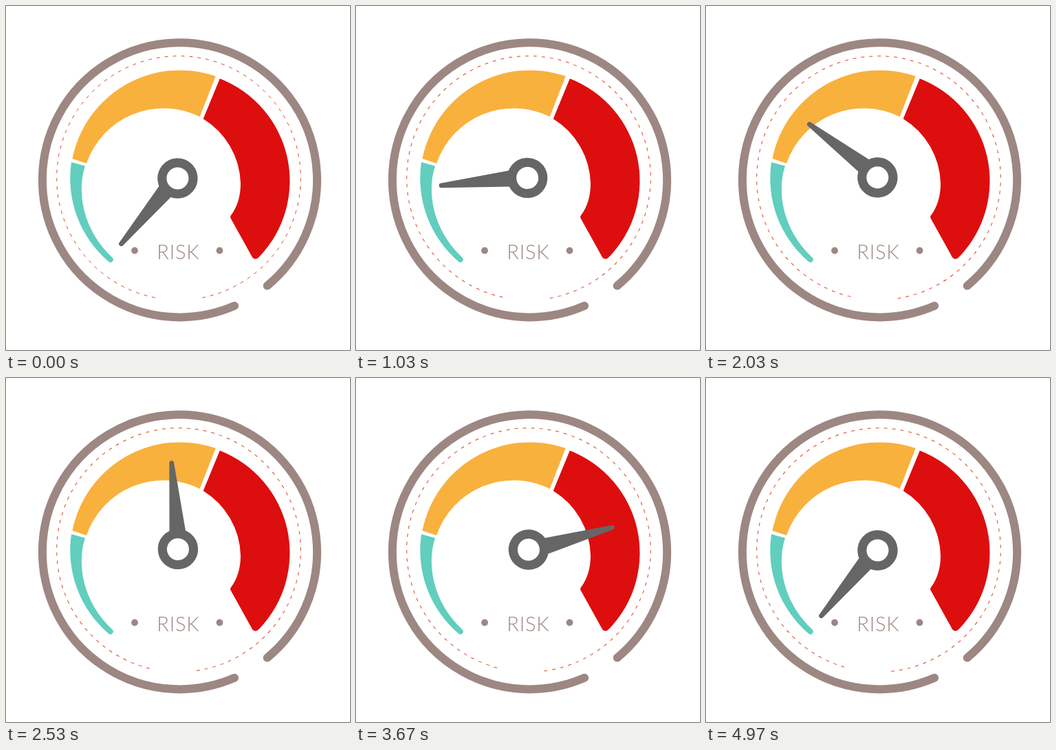
Recreate the animation shown at these times as an HTML page. Size 500x500 px, loop 5010 ms.

```html
<!DOCTYPE html>
<html lang="en">
<head>
<meta charset="utf-8">
<title>Risk gauge</title>
<style>
  html, body { margin: 0; width: 100%; height: 100%; overflow: hidden; background: #fff; }
  svg { display: block; width: 100vw; height: 100vh; }
  text { font: 300 29px Lato, "Open Sans", sans-serif; letter-spacing: 0.8px; }
</style>
</head>
<body>
<svg viewBox="0 0 500 500">
  <path id="rim" fill="none" stroke="#9d8782" stroke-width="12" stroke-linecap="round"/>
  <path id="dashes" fill="none" stroke="#dc4526" stroke-width="1"
    pathLength="1049" stroke-dasharray="5 7"/>

  <path fill="#61cebe" d="M95 227 L115 232.5 C102.5 270 111.5 326 155 366
    A4.1 4.1 0 0 1 149 371.5 A159.5 159.5 0 0 1 95 227Z"/>
  <path fill="#f9b13d" d="M96.5 222 A159.5 159.5 0 0 1 304.7 102 L281.7 161
    A118.5 118.5 0 0 0 117 228.7Z"/>
  <path fill="#dd0e0e" d="M310.8 105.5 A159.5 159.5 0 0 1 368.6 364 Q363.3 370.5 358.2 365.5
    L326.8 309 Q325.3 306.3 327 304.3 C337 291 341 275 341 258
    A114 114 0 0 0 286.7 164Z"/>

  <g fill="#9d8782">
    <circle cx="187" cy="355.5" r="4.9"/>
    <circle cx="310.5" cy="355.5" r="4.9"/>
    <text x="250.4" y="367.8" text-anchor="middle">RISK</text>
  </g>

  <g id="needle">
    <path fill="#666" d="M-3.4 -126.5 A3.4 3.4 0 0 1 3.4 -126.5 L13 -27 L0 -20 L-10.5 -27Z"/>
    <circle cy="-0.9" r="22.6" fill="#fff" stroke="#666" stroke-width="13.2"/>
  </g>
</svg>
<script>
  const LOOP = 5010;
  const DRIFT = 0.044; // degrees per step

  // step, needle angle from upright, degrees per step
  const KEYS = [
    [0, -139.3, 0.9],
    [25, -95, 1.8],
    [49, -52, 2.2],
    [61, -4.2, 7],
    [77, 139.4, 0],
    [99, -28.8, -7.2],
    [119, -139.3, 0]
  ];

  const get = id => document.getElementById(id);
  const needle = get('needle');
  const dashes = get('dashes');

  function point(cx, cy, r, deg) {
    const a = deg * Math.PI / 180;
    return `${cx + r * Math.cos(a)} ${cy + r * Math.sin(a)}`;
  }

  function arc(cx, cy, r, from, to) {
    return `M${point(cx, cy, r, from)} A${r} ${r} 0 1 1 ${point(cx, cy, r, to)}`;
  }

  // Smooth Hermite curve through the keys
  function angleAt(step) {
    let i = 1;
    while (i < KEYS.length - 1 && step > KEYS[i][0]) i++;
    const [s0, a0, v0] = KEYS[i - 1];
    const [s1, a1, v1] = KEYS[i];
    const span = s1 - s0;
    const u = (step - s0) / span;
    const w = 1 - u;
    return a0 * w * w * (1 + 2 * u) + a1 * u * u * (3 - 2 * u)
      + span * u * w * (v0 * w - v1 * u);
  }

  // 24 poses per second shown on a 30 per second clock
  function stepAt(ms) {
    const tick = Math.min(149, Math.floor(ms * 0.03 + 0.101));
    return Math.floor((tick * 4 + 1) / 5);
  }

  function draw(ms) {
    const step = stepAt(ms);
    needle.setAttribute('transform', `translate(250 249.8) rotate(${angleAt(step)})`);
    dashes.setAttribute('transform', `rotate(${step * DRIFT} 251 250)`);
  }

  get('rim').setAttribute('d', arc(252.5, 252.8, 199.6, 66.5, 50.4));
  dashes.setAttribute('d', arc(251, 250, 177.3, 101.1, 78.9));

  const start = performance.now();
  function tick() {
    draw((performance.now() - start) % LOOP);
    requestAnimationFrame(tick);
  }
  draw(0);
  requestAnimationFrame(tick);
</script>
</body>
</html>
```
